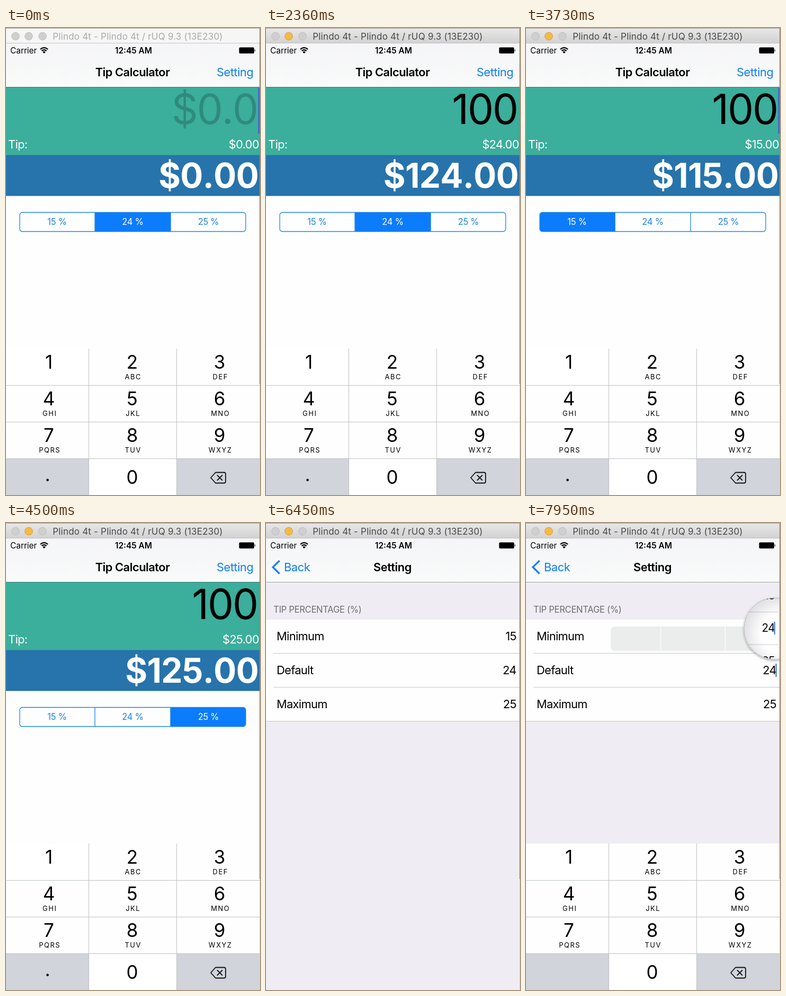
Recreate the animation shown at these times as an HTML page. Size 480 by 880 pixels, loop 8000 ms.

```html
<!DOCTYPE html>
<html lang="en">
<head>
<meta charset="utf-8">
<title>Tip Calculator</title>
<style>
html, body { margin: 0; width: 100%; height: 100%; overflow: hidden; background: #fff; }
svg { display: block; width: 480px; height: 880px; }
text { font-family: Inter, Roboto, sans-serif; white-space: pre; }
.end { text-anchor: end; }
.mid { text-anchor: middle; }
.body { font-size: 21.8px; letter-spacing: -.03em; }
.link { letter-spacing: -.02em; }
.bold { font-weight: 600; letter-spacing: -.021em; }
.small { font-size: 16.6px; letter-spacing: -.018em; }
.status { font-size: 15.4px; }
.amount { font-size: 78px; letter-spacing: -2.2px; font-kerning: none; }
.total { font-size: 64px; font-weight: 650; letter-spacing: -.8px; font-kerning: none; }
.tint { fill: #0b7cfb; }
.digit { font-size: 35px; }
.letters { font-size: 13px; letter-spacing: 1.5px; }
.rule { stroke: #c6c6c9; fill: none; }

/* Whole cycle is 8 s, so 1% = 80 ms */
.anim, .key1, .key0 { animation: 8s linear infinite; }
.hard, .key1, .key0 { animation-timing-function: step-end; }
.focus-lost { animation-name: focus-lost; }
.focus-gained { animation-name: focus-gained; }
.key1 { animation-name: key1; }
.key0 { animation-name: key0; }
.blink { animation-name: blink; }
.dot { animation-name: dot; }
.tap { animation-name: tap; }
.page-out { animation-name: page-out; }
.page-in { animation-name: page-in; }
.nav-out { animation-name: nav-out; }
.nav-in { animation-name: nav-in; }
.keyboard { animation-name: keyboard; }
.field-caret { animation-name: field-caret; }
.loupe { animation-name: loupe; transform-origin: 470px 277px; }
.menu { animation-name: menu; }

@keyframes focus-lost { 0% { opacity: 1; } 6%, 100% { opacity: 0; } }
@keyframes focus-gained { 0% { opacity: 0; } 6%, 100% { opacity: 1; } }
@keyframes key1 { 0% { fill: #fff; } 9.3% { fill: #d1d4da; } 10.9%, 100% { fill: #fff; } }
@keyframes key0 {
  0% { fill: #fff; } 14.3% { fill: #d1d4da; } 16.2% { fill: #fff; }
  18.8% { fill: #d1d4da; } 20.3%, 100% { fill: #fff; }
}
@keyframes blink {
  0% { opacity: 1; } 3.75% { opacity: 0; } 8% { opacity: 1; }
  28.5% { opacity: 0; } 33% { opacity: 1; } 41.3% { opacity: 0; } 45.5% { opacity: 1; }
  53.8% { opacity: 0; } 58% { opacity: 1; } 66.3%, 100% { opacity: 0; }
}
@keyframes dot { 0% { opacity: 1; } 76%, 100% { opacity: 0; } }
@keyframes tap { 0%, 66.9% { opacity: 1; } 67.3%, 100% { opacity: .2; } }
@keyframes page-out {
  0%, 69.5% { transform: none; animation-timing-function: cubic-bezier(.2,.8,.2,1); }
  75.75%, 100% { transform: translateX(-144px); }
}
@keyframes page-in {
  0%, 69.5% { transform: translateX(480px); animation-timing-function: cubic-bezier(.2,.8,.2,1); }
  75.75%, 100% { transform: none; }
}
@keyframes nav-out {
  0%, 69.5% { transform: none; opacity: 1; animation-timing-function: cubic-bezier(.2,.8,.2,1); }
  75.75%, 100% { transform: translateX(-150px); opacity: 0; }
}
@keyframes nav-in {
  0%, 69.5% { transform: translateX(180px); opacity: 0; animation-timing-function: cubic-bezier(.2,.8,.2,1); }
  75.75%, 100% { transform: none; opacity: 1; }
}
@keyframes keyboard {
  0%, 69.5% { transform: none; animation-timing-function: cubic-bezier(.2,.8,.2,1); }
  75.75% { transform: translateX(-480px); animation-timing-function: step-end; }
  85.6% { transform: translateY(276px); animation-timing-function: cubic-bezier(.2,.8,.2,1); }
  89.5%, 100% { transform: none; }
}
@keyframes field-caret { 0% { opacity: 0; } 85.6% { opacity: 1; } 91.5% { opacity: 0; } 95%, 100% { opacity: 1; } }
@keyframes loupe {
  0%, 95% { transform: scale(0); } 96.5%, 98.4% { transform: scale(1.25); }
  99.375%, 100% { transform: none; }
}
@keyframes menu { 0%, 98.7% { opacity: 0; } 99.375%, 100% { opacity: 1; } }
</style>
</head>
<body>
<svg viewBox="0 0 480 880">
  <defs>
    <linearGradient id="chrome" x2="0" y2="1">
      <stop stop-color="#e9e8e9"/><stop offset="1" stop-color="#d2d1d2"/>
    </linearGradient>
    <linearGradient id="bar" x2="0" y2="1">
      <stop stop-color="#f5f5f7"/><stop offset="1" stop-color="#f9fafa"/>
    </linearGradient>
    <radialGradient id="glass" cx=".6" cy=".58" r=".65">
      <stop offset=".5" stop-color="#778" stop-opacity="0"/>
      <stop offset="1" stop-color="#778" stop-opacity=".25"/>
    </radialGradient>
    <filter id="shadow" x="-20%" y="-20%" width="140%" height="140%">
      <feDropShadow dx="0" dy="2" stdDeviation="2" flood-opacity=".35"/>
    </filter>
    <clipPath id="segmentClip"><rect x="26" y="347.5" width="427" height="36" rx="5"/></clipPath>
    <clipPath id="loupeClip"><circle cx="470" cy="199" r="58"/></clipPath>
  </defs>

  <rect width="480" height="880" fill="#fff"/>

  <g class="anim page-out">
    <rect width="480" height="880" fill="#fefefe"/>
    <rect y="111" width="480" height="129" fill="#3bae9c"/>
    <rect y="239.5" width="480" height="77" fill="#2773ab"/>
    <text id="amount" class="amount end" x="475" y="181"></text>
    <rect class="anim hard blink" x="476.5" y="113" width="2.5" height="86" fill="#4565c9"/>
    <g fill="#fff">
      <text class="body" x="4" y="227">Tip:</text>
      <text id="tip" class="body end" x="478" y="227"></text>
      <text id="total" class="total end" x="477" y="301"></text>
    </g>
    <rect id="selected" y="347" width="143" height="37" fill="#0b7cfb" clip-path="url(#segmentClip)"/>
    <g fill="none" stroke="#1c82e6" stroke-width="1.3">
      <rect x="26" y="347.5" width="427" height="36" rx="5"/>
      <path d="M168 347.5v36M311 347.5v36"/>
    </g>
    <g id="segments"></g>
  </g>

  <g class="anim page-in">
    <rect width="480" height="880" fill="#efedf3"/>
    <text class="small" x="14" y="168.5" fill="#6d6d72">TIP PERCENTAGE (%)</text>
    <g id="rows">
      <rect y="182" width="480" height="191" fill="#fefefe"/>
      <path class="rule" d="M14 245.5H480M14 309.5H480M0 373.5H480"/>
    </g>
    <rect class="anim hard field-caret" x="471.5" y="265" width="2.2" height="25" fill="#3d7bd0"/>
  </g>

  <g class="anim menu">
    <rect x="160" y="195" width="312" height="46" rx="8" fill="#ebecec"/>
    <path d="M254.5 195v46M376.5 195v46" stroke="#fafafa" stroke-width="1.5"/>
  </g>

  <g class="anim keyboard" id="keyboard">
    <g id="keys"></g>
    <path class="rule" d="M156.5 604V880M322.5 604V880M0 673.5H480M0 742.5H480M0 811.5H480" style="stroke:#bfc0c3"/>
    <text class="digit mid anim hard dot" x="78.5" y="854">.</text>
    <path d="M396 837.5H412Q415 837.5 415 840.5V854.5Q415 857.5 412 857.5H396L387 847.5ZM399.5 843l9 9m0-9l-9 9"
      fill="none" stroke="#111" stroke-width="1.8" stroke-linejoin="round" stroke-linecap="round"/>
  </g>

  <rect y="28" width="480" height="83" fill="url(#bar)"/>
  <path d="M0 111.5H480" stroke="#9fa6a6"/>
  <g class="anim nav-out">
    <path d="M0 111.5H480" stroke="#3c7a70"/>
    <text class="body bold mid" x="239" y="91">Tip Calculator</text>
    <text class="body link tint end anim tap" x="467.5" y="91">Setting</text>
  </g>
  <g class="anim nav-in">
    <path d="M25.5 71L13 83.2L25.5 95.5" fill="none" stroke="#0b7cfb" stroke-width="3.2"/>
    <text class="body link tint" x="34" y="91">Back</text>
    <text class="body bold mid" x="239" y="91">Setting</text>
  </g>

  <text class="status" x="8" y="48">Carrier</text>
  <g fill="none" stroke="#111" stroke-width="2.3">
    <path d="M64.8 40.2Q72 33.8 79.2 40.2M67.4 43.2Q72 39.2 76.6 43.2"/>
  </g>
  <path d="M72 48L69.2 45.2Q72 42.9 74.8 45.2Z"/>
  <text class="status mid" x="241" y="48" font-weight="600">12:45 AM</text>
  <rect x="440.5" y="36.5" width="28.5" height="11.5" rx="2"/>
  <path d="M470 40q2.4 2.2 0 4.5z"/>

  <g class="anim loupe">
    <circle cx="470" cy="199" r="58.5" fill="#fff" filter="url(#shadow)"/>
    <g clip-path="url(#loupeClip)">
      <use href="#rows" transform="translate(16 -68) scale(.96)"/>
      <rect x="468.7" y="186" width="2.2" height="24" fill="#3d7bd0"/>
      <circle cx="470" cy="199" r="58" fill="url(#glass)"/>
    </g>
    <circle cx="470" cy="199" r="58" fill="none" stroke="#b4b4b8"/>
  </g>

  <rect width="480" height="29" fill="#f6f6f6"/>
  <rect class="anim hard focus-gained" width="480" height="29" fill="url(#chrome)"/>
  <path d="M0 .5H480" stroke="#a3988e"/>
  <path d="M0 28.5H480" stroke="#c3c2c3"/>
  <g fill="#d0cfd0" stroke="#bdbcbd">
    <circle cx="18" cy="15.5" r="7.3"/><circle cx="43" cy="15.5" r="7.3"/><circle cx="69" cy="15.5" r="7.3"/>
  </g>
  <circle class="anim hard focus-gained" cx="43" cy="15.5" r="7.3" fill="#f6b942" stroke="#dca03a"/>
  <g class="mid" font-size="17" letter-spacing=".2">
    <text class="anim hard focus-lost" x="249" y="21.5" fill="#a9a9a9">Plindo 4t - Plindo 4t / rUQ 9.3 (13E230)</text>
    <text class="anim hard focus-gained" x="249" y="21.5" fill="#484848">Plindo 4t - Plindo 4t / rUQ 9.3 (13E230)</text>
  </g>
  <path d="M479.5 1V671" stroke="#8b827b"/>
  <path d="M479.5 671V880" stroke="#d6d5d8"/>
</svg>
<script>
const LOOP = 8000;
const PERCENTS = [15, 24, 25];
const $ = id => document.getElementById(id);

function add(parent, tag, attrs, content = "") {
  const el = document.createElementNS("http://www.w3.org/2000/svg", tag);
  for (const name in attrs) el.setAttribute(name, attrs[name]);
  el.textContent = content;
  return parent.appendChild(el);
}

function buildKeyboard() {
  const letters = ["", "ABC", "DEF", "GHI", "JKL", "MNO", "PQRS", "TUV", "WXYZ"];
  const labels = [1, 2, 3, 4, 5, 6, 7, 8, 9, "", 0, ""];
  const edges = [0, 156.5, 322.5, 480];
  const centers = [81, 238.5, 403.5];
  labels.forEach((label, i) => {
    const col = i % 3, row = Math.floor(i / 3), y = 604 + row * 69.2;
    add($("keys"), "rect", {
      x: edges[col], y, width: edges[col + 1] - edges[col], height: 70,
      fill: label === "" ? "#d1d4da" : "#fefefe", class: label === "" ? "" : "key" + label
    });
    add($("keys"), "text", { class: "digit mid", x: centers[col], y: row < 3 ? 642 + row * 69 : 858.5 }, label);
    if (letters[i]) add($("keys"), "text", { class: "letters mid", x: centers[col] + 1.7, y: 662 + row * 69 }, letters[i]);
  });
}

const segments = PERCENTS.map((p, i) =>
  add($("segments"), "text", { class: "small mid", x: 96.5 + i * 143, y: 371 }, p + " %"));

["Minimum", "Default", "Maximum"].forEach((name, i) => {
  const y = 221 + i * 63.8;
  add($("rows"), "text", { class: "body", x: 20, y }, name);
  add($("rows"), "text", { class: "body end", x: 473, y }, PERCENTS[i]);
});

buildKeyboard();

// [start time, typed amount, chosen segment]
const steps = [
  [0, "", 1], [780, "1", 1], [1170, "10", 1], [1530, "100", 1],
  [2900, "100", 0], [4150, "100", 2], [4800, "100", 1]
];
let shown;

function show(step) {
  const [, typed, choice] = step;
  const bill = Number(typed), tip = bill * PERCENTS[choice] / 100;
  $("amount").textContent = typed || "$0.0";
  $("amount").setAttribute("fill-opacity", typed ? 1 : .2);
  $("tip").textContent = "$" + tip.toFixed(2);
  $("total").textContent = "$" + (bill + tip).toFixed(2);
  $("selected").setAttribute("x", 25.5 + choice * 142.7);
  segments.forEach((el, i) => el.setAttribute("fill", i === choice ? "#fff" : "#1c82e6"));
}

const start = performance.now();
function frame() {
  const time = (performance.now() - start) % LOOP;
  const step = steps.findLast(s => s[0] <= time);
  if (step !== shown) show(shown = step);
  requestAnimationFrame(frame);
}
frame();
</script>
</body>
</html>
```
